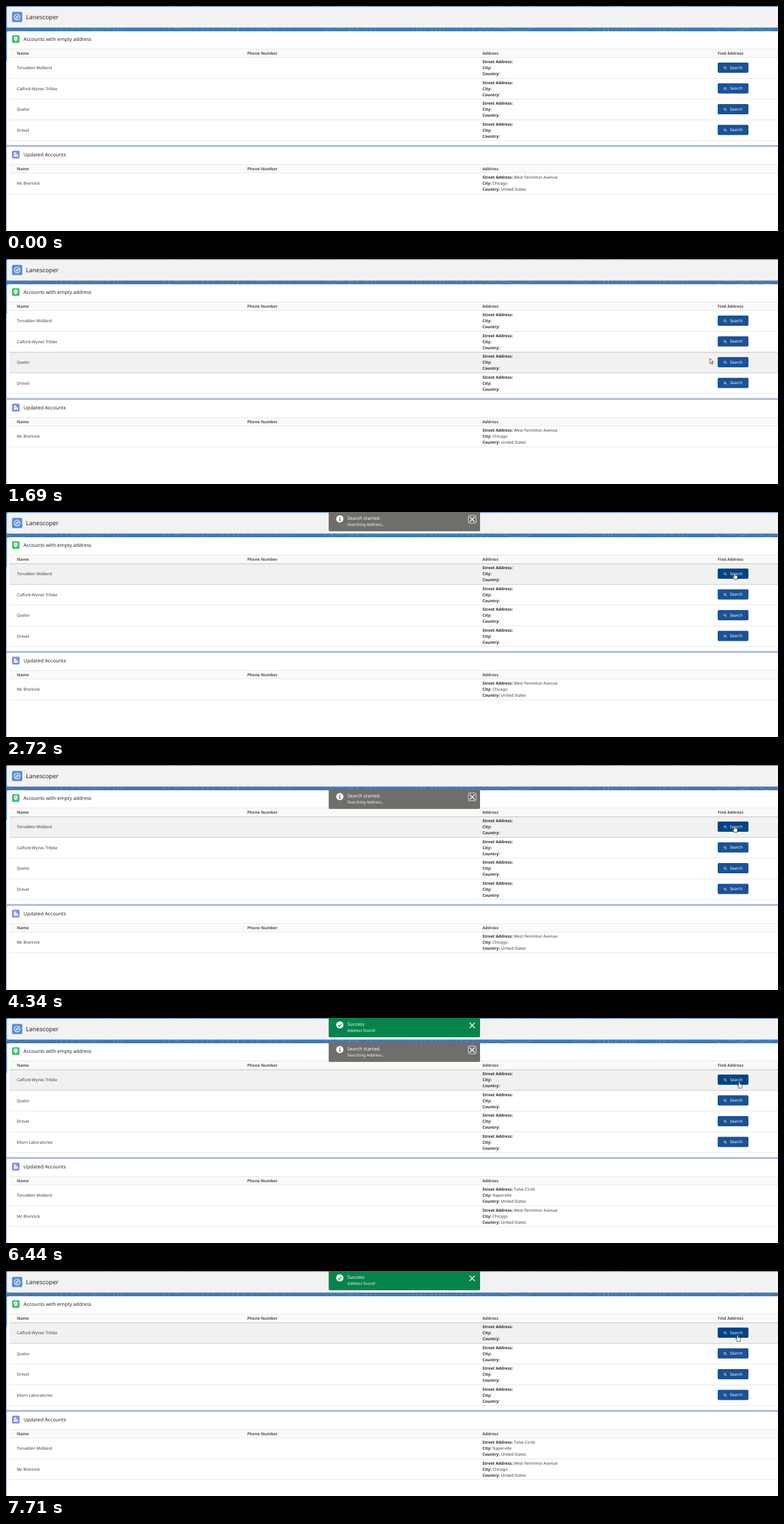
Recreate the animation shown at these times as an HTML page. Size 1280 by 374 pixels, loop 8 s.

```html
<!DOCTYPE html>
<html lang="en">
<head>
<meta charset="utf-8">
<title>Address finder</title>
<style>
  html, body { margin: 0; width: 100%; height: 100%; overflow: hidden; background: #fff; }
  svg { display: block; width: 1280px; height: 374px; }
  text { font-family: "Noto Sans", "Open Sans", sans-serif; font-size: 6.67px; fill: #3a3938;
         text-rendering: geometricPrecision; white-space: pre; }
  .head { font-weight: 700; fill: #514f4d; }
  .strong { font-weight: 600; fill: #2b2826; }
  .title { font-size: 8.2px; fill: #2b2826; }
  .page { font-size: 10px; font-weight: 300; fill: #2b2826; }
  .light { fill: #fff; }
  .button { font-weight: 500; fill: #fff; }
</style>
</head>
<body>
<svg id="stage" viewBox="0 0 1280 374">
  <g id="backdrop"></g>
  <g id="live"></g>
</svg>
<script>
const LOOP = 8000, TICK = 77.78, FIRST_TICK = 206;
const ROW = 34.5, COLUMNS = [18, 400, 790, 1180];
const ACCOUNTS_TOP = 86, UPDATED_TOP = 278;
const REFRESH = 55;

const pending = ["Torvalden Midland", "Calford-Wynes Tribbe", "Quelor", "Drovel", "Ellorn Laboratories"];
const updated = [
  { name: "Torvalden Midland", street: "Tulve Circle", city: "Naperville", country: "United States" },
  { name: "Mc Brennick", street: "West Fennimor Avenue", city: "Chicago", country: "United States" }
];

// Pointer path: tick, x, y
const path = [
  [0, 1230, 336], [3, 1225, 314], [4, 1226, 317], [5, 1226, 317], [11, 1212, 267], [13, 1212, 267],
  [19, 1167, 165], [24, 1208, 101], [79, 1208, 101], [85, 1254, 128], [88, 1254, 128],
  [89, 1247, 121], [91, 1222, 115], [93, 1222, 115], [96, 1213, 106]
];

const clamp = v => Math.max(0, Math.min(1, v));
const text = (x, y, s, cls = "", extra = "") => `<text x="${x}" y="${y}" class="${cls}" ${extra}>${s}</text>`;
const rect = (x, y, w, h, fill, extra = "") =>
  `<rect x="${x}" y="${y}" width="${w}" height="${h}" fill="${fill}" ${extra}/>`;
const shape = (d, fill, extra = "") => `<path d="${d}" fill="${fill}" ${extra}/>`;
const at = (x, y, content, extra = "") => `<g transform="translate(${x} ${y})" ${extra}>${content}</g>`;

function tableHead(top, labels) {
  return rect(6, top - 14.5, 1274, 14.5, "#fafaf9") +
    rect(6, top - 14.7, 1274, .6, "#dddbda") + rect(6, top - .6, 1274, .6, "#dddbda") +
    labels.map((s, i) => text(COLUMNS[i], top - 4.9, s, "head")).join("");
}

function backdrop() {
  let rings = "";
  for (let i = 0; i < 16; i++) {
    const x = 20 + i * 84 + 22 * Math.sin(i * 2.4), y = 30 + 14 * Math.sin(i * 1.7);
    for (let r = 1; r < 5; r++)
      rings += `<ellipse cx="${x}" cy="${y}" rx="${r * 11}" ry="${r * 6}" transform="rotate(${i * 37} ${x} ${y})"/>`;
  }
  const compass = rect(0, 0, 17, 17, "#5b8ddb", 'rx="2"') +
    '<circle cx="8.5" cy="8.5" r="4.7" fill="none" stroke="#fff" stroke-width="1.2"/>' +
    shape("M11.2 5.8L9.7 9.7 5.8 11.2 7.3 7.3Z", "#fff") + '<circle cx="8.5" cy="8.5" r=".8" fill="#5b8ddb"/>';
  const pin = rect(0, 0, 12.5, 13, "#4bc076", 'rx="2"') +
    shape("M6.2 10.6C5 9 3.2 7.2 3.2 5.3a3 3 0 0 1 6 0C9.2 7.2 7.4 9 6.2 10.6Z", "#fff") +
    '<circle cx="6.2" cy="5.2" r="1.1" fill="#4bc076"/>';
  const building = rect(0, 0, 12.5, 13, "#7f8de1", 'rx="2"') +
    shape("M3 3H7V10H3ZM7.5 6H10V10H7.5Z", "#fff") +
    shape("M4 4.5H6M4 6H6M4 7.5H6M8.2 7.5H9.4", "none", 'stroke="#7f8de1" stroke-width=".7"');

  return rect(0, 0, 1280, 374, "#aebbdd") + rect(0, 0, 1280, 91, "#3f78b5") +
    `<g fill="none" stroke="#fff" stroke-opacity=".22" stroke-width=".8">${rings}</g>` +
    rect(1.5, 1.2, 1290, 34.5, "#f3f2f2", 'rx="2" stroke="#d5d8dd" stroke-width=".5"') +
    rect(1.5, 42, 1290, 189, "#fff", 'rx="2"') + rect(1.5, 234.2, 1290, 150, "#fff", 'rx="2"') +
    at(10, 9.7, compass) + text(33, 21.6, "Lanescoper", "page") +
    at(10, 48.5, pin) + text(29, 57.8, "Accounts with empty address", "title") +
    at(10, 240.5, building) + text(29, 249.8, "Updated Accounts", "title") +
    tableHead(ACCOUNTS_TOP, ["Name", "Phone Number", "Address", "Find Address"]) +
    tableHead(UPDATED_TOP, ["Name", "Phone Number", "Address"]);
}

function row(top, account, hovered) {
  const lines = [["Street Address:", account.street], ["City:", account.city], ["Country:", account.country]];
  const edge = hovered ? "#bdbbb9" : "#dddbda";
  return (hovered ? rect(6, top, 1274, ROW, "#f1f1f1") + rect(6, top - .2, 1274, .7, edge) : "") +
    rect(6, top + ROW - .6, 1274, .7, edge) +
    text(COLUMNS[0], top + 19.2, account.name) +
    lines.map(([label, value], i) => text(COLUMNS[2], top + 9.3 + i * 10,
      `<tspan class="strong">${label}</tspan>${value ? " " + value : ""}`)).join("");
}

function button(top, hovered) {
  return at(1180, top + 8, rect(0, 0, 51, 17, hovered ? "#014486" : "#1b5297", 'rx="2"') +
    '<circle cx="12" cy="8.4" r="1.5" fill="none" stroke="#fff" stroke-width=".7"/>' +
    shape("M13.1 9.5L15 11.4", "none", 'stroke="#fff" stroke-width=".8"') +
    text(20.2, 10.8, "Search", "button"));
}

function toast(y, opacity, color, title, detail, mark, focused) {
  if (opacity <= 0) return "";
  return at(535, y, rect(0, -.6, 251, 32.6, color, 'rx="2"') +
    '<circle cx="18.5" cy="11.6" r="6" fill="#fff"/>' + mark(color) +
    text(31, 13, title, "light", 'style="font-size:7.85px"') +
    text(31, 23.4, detail, "light", 'style="font-size:6.5px"') +
    shape("M234 8.2L242 16.2M242 8.2L234 16.2", "none", 'stroke="#fff" stroke-width="1.4" stroke-linecap="round"') +
    (focused ? rect(231.5, 5.6, 13, 13, "none", 'rx="2" stroke="#fff" stroke-width=".8"') : ""),
    `opacity="${opacity}"`);
}

const infoMark = c => shape("M17.6 8h1.8v1.7h-1.8ZM17 10.7h2.3v3.4h.8v1h-3.1v-1h.7v-2.4H17Z", c);
const checkMark = c => shape("M15.5 11.8L17.7 14 21.6 9.6", "none", `stroke="${c}" stroke-width="1.4"`);

function toasts(tick) {
  const slide = p => -33 * (1 - p) ** 2;
  const started = clamp((tick - 27) / 5), found = clamp((tick - 53) / 4);
  const fade = 1 - clamp((tick - 93) / 3);
  return toast(tick < 53 ? slide(started) : 41, started * fade, "#706e6b",
      "Search started.", "Searching Address...", infoMark, true) +
    toast(slide(found), found, "#04844b", "Success", "Address found!", checkMark, false);
}

function pointerAt(tick) {
  if (tick < 0) return null;
  const next = path.findIndex(p => p[0] > tick);
  if (next < 0) return path[path.length - 1].slice(1);
  const [t0, x0, y0] = path[next - 1], [t1, x1, y1] = path[next];
  const p = (tick - t0) / (t1 - t0);
  return [x0 + (x1 - x0) * p, y0 + (y1 - y0) * p];
}

function pointer(x, y, isHand) {
  const d = isHand
    ? "M-1 1Q0-.5 1 1V4.2L4 4.8Q5 5 5 6.2L4.4 9.5V11H-1.2V9.6L-3.2 6.6Q-3.2 5.5-2.2 5.8L-1 6.8Z"
    : "M0 0V8.7L2 7 3.4 10.2 4.9 9.6 3.6 6.4H6.2Z";
  return at(x, y, shape(d, "#fff", 'stroke="#222" stroke-width=".75" stroke-linejoin="round"'));
}

function scene(tick) {
  const refreshed = tick >= REFRESH;
  const [x, y] = pointerAt(tick) || [-99, -99];
  const over = top => y >= top && y < top + ROW;
  let hand = false, out = "";
  const draw = (tableTop, list, hasButton) => {
    // The hovered row goes last so that its edges stay on top.
    list.map((account, i) => ({ account, top: tableTop + i * ROW }))
      .sort((a, b) => over(a.top) - over(b.top))
      .forEach(({ account, top }) => {
        out += row(top, account, over(top));
        if (!hasButton) return;
        const hot = x >= 1180 && x <= 1231 && y >= top + 8 && y <= top + 25;
        hand = hand || hot;
        out += button(top, hot);
      });
  };
  const first = refreshed ? 1 : 0;
  draw(ACCOUNTS_TOP, pending.slice(first, first + 4).map(name => ({ name })), true);
  draw(UPDATED_TOP, refreshed ? updated : updated.slice(1), false);
  return out + toasts(tick) + (tick < 0 ? "" : pointer(x, y, hand));
}

const live = document.getElementById("live");
document.getElementById("backdrop").innerHTML = backdrop();
let shown = null;

function frame() {
  const tick = Math.max(-1, Math.floor((performance.now() % LOOP - FIRST_TICK) / TICK));
  if (tick !== shown) live.innerHTML = scene(shown = tick);
  requestAnimationFrame(frame);
}
frame();
</script>
</body>
</html>
```
